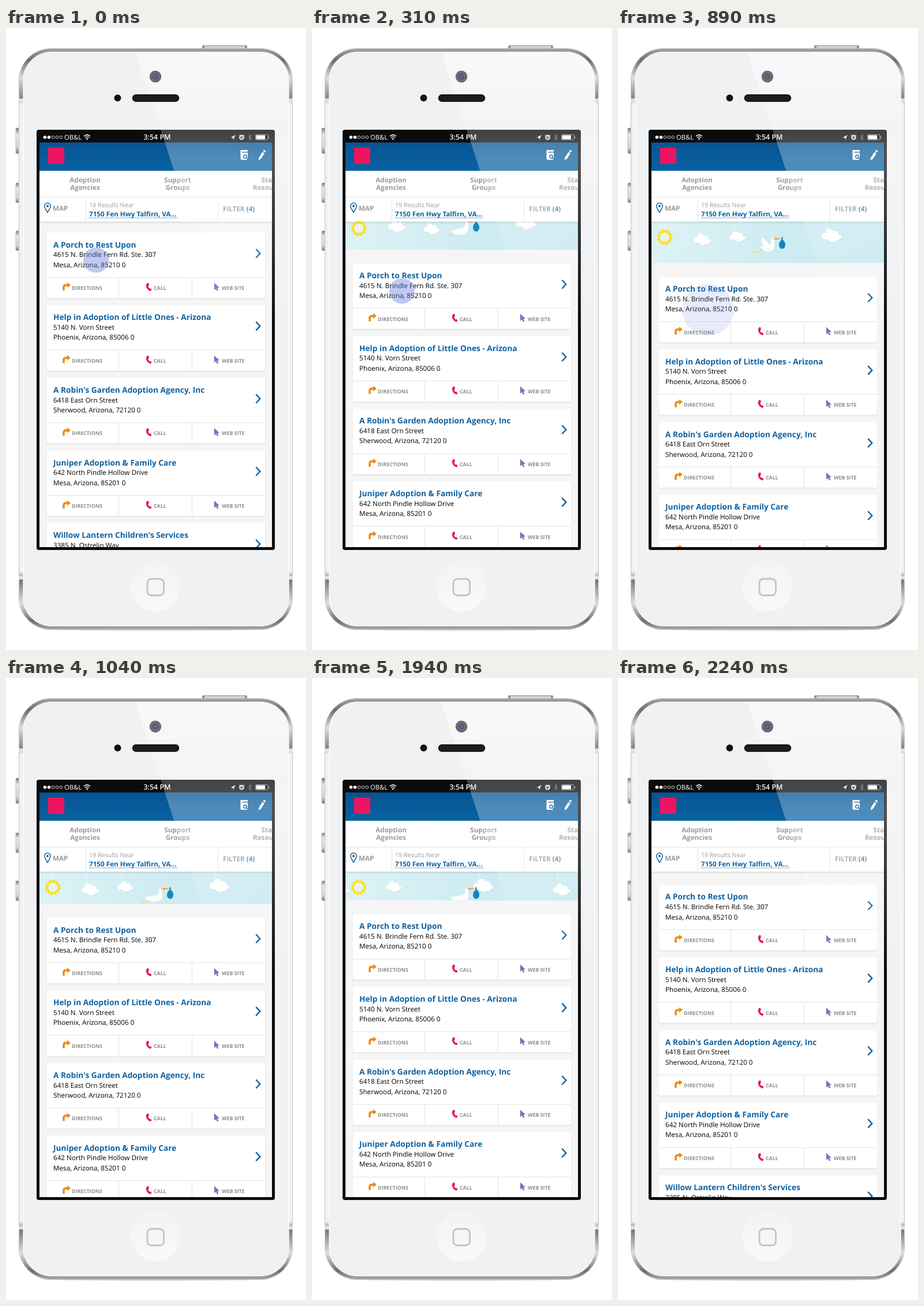
Write an HTML page that moves like this. It is 520 by 1076 pixels and loops after 2.45 s.

```html
<!DOCTYPE html>
<html lang="en">
<head>
<meta charset="utf-8">
<title>Pull to refresh</title>
<style>
  html, body { margin: 0; width: 100%; height: 100%; overflow: hidden; background: #fff; }
  svg { display: block; width: 100%; height: 100%; }
  text { font: 11.7px "Open Sans", sans-serif; text-rendering: geometricPrecision; }
  .b { font-weight: 700; }
  .grey { fill: #9b9b9b; }
  .blue { fill: #0f62a2; }
  .mid { text-anchor: middle; }
  .title { font-size: 13.7px; }
  .foot { font-size: 8.8px; fill: #8c8c8c; }
  .line { stroke: #e2e3e4; fill: none; }
</style>
</head>
<body>
<svg viewBox="0 0 520 1076">
  <defs>
    <linearGradient id="metal" x2="0" y2="1">
      <stop offset="0" stop-color="#a5a5a5"/><stop offset=".02" stop-color="#6c6d6e"/>
      <stop offset=".05" stop-color="#dcdede"/><stop offset=".085" stop-color="#858686"/>
      <stop offset=".095" stop-color="#eff2f1"/><stop offset=".9" stop-color="#eff2f1"/>
      <stop offset=".915" stop-color="#777878"/><stop offset=".955" stop-color="#dfe1e1"/>
      <stop offset=".985" stop-color="#6c6d6e"/><stop offset="1" stop-color="#aaa"/>
    </linearGradient>
    <linearGradient id="key" x2="0" y2="1">
      <stop offset="0" stop-color="#777"/><stop offset=".25" stop-color="#e8e8e8"/>
      <stop offset=".75" stop-color="#d5d6d6"/><stop offset="1" stop-color="#777"/>
    </linearGradient>
    <linearGradient id="head" x2="0" y2="1">
      <stop offset="0" stop-color="#055493"/><stop offset="1" stop-color="#0a62a2"/>
    </linearGradient>
    <linearGradient id="sky">
      <stop offset="0" stop-color="#ddf2f5"/><stop offset=".6" stop-color="#cdebf2"/><stop offset="1" stop-color="#c9e9f1"/>
    </linearGradient>
    <linearGradient id="gloss" gradientUnits="userSpaceOnUse" x1="0" y1="42" x2="0" y2="520">
      <stop offset="0" stop-color="#fff" stop-opacity=".55"/><stop offset=".27" stop-color="#fff" stop-opacity=".22"/>
      <stop offset=".38" stop-color="#fff" stop-opacity=".29"/><stop offset="1" stop-color="#fff" stop-opacity="0"/>
    </linearGradient>
    <linearGradient id="home" x2="0" y2="1">
      <stop offset="0" stop-color="#f3f3f4"/><stop offset="1" stop-color="#f9f9fa"/>
    </linearGradient>
    <linearGradient id="under" x2="0" y2="1">
      <stop offset="0" stop-opacity=".12"/><stop offset="1" stop-opacity="0"/>
    </linearGradient>
    <pattern id="mesh" width="3" height="3" patternUnits="userSpaceOnUse">
      <rect width="3" height="3" fill="#151515"/><circle cx="1.5" cy="1.5" r=".7" fill="#444"/>
    </pattern>
    <clipPath id="view"><rect x="58" y="335" width="403" height="563"/></clipPath>
    <clipPath id="screen"><rect x="58" y="181" width="403" height="717"/></clipPath>
    <clipPath id="skyClip"><rect id="skyBox" x="58" y="335" width="403" height="0"/></clipPath>

    <g id="cloud">
      <path d="M-7-8V-60" stroke="#fff" stroke-width=".8" opacity=".8"/>
      <path d="M-14 2C-14-3-9-4-8-2C-10-10 1-12 3-5C7-8 12-4 11 0C15 0 18 5 15 6C11 6 10 8 9 10C7 9 4 9 2 12C0 9-4 10-6 6C-9 8-14 6-14 2Z" fill="#c6dde4"/>
      <path d="M-15 1C-15-4-10-5-9-3C-11-11 0-13 2-6C6-9 11-5 10-1C14-1 17 4 14 5C10 5 9 7 8 9C6 8 3 8 1 11C-1 8-5 9-7 5C-10 7-15 5-15 1Z" fill="#fff"/>
    </g>

    <!-- one card, without its words -->
    <g id="card">
      <rect x="69.5" y="355" width="381" height="115" rx="3" fill="#000" opacity=".025"/>
      <rect x="70" y="354.5" width="380" height="114" rx="2" fill="#000" opacity=".05"/>
      <rect x="70.5" y="354" width="379" height="113.3" rx="2" fill="#fff"/>
      <path class="line" d="M70.5 431.5H449.5M195.5 432V467M322.5 432V467"/>
      <path d="M433.3 382.5L440.3 390L433.3 397.5" fill="none" stroke="#0f62a2" stroke-width="2.4"/>
      <path d="M100 454V448.500Q100 444.800 104 444.800H107" fill="none" stroke="#f18a0e" stroke-width="3.6"/>
      <path d="M106 440L112 444.700L106 449.500Z" fill="#f18a0e"/>
      <path d="M244.5 441.500L247 441L248 445L246.300 446.600Q247 449.500 249.300 451L251.300 450.300L252.300 453.400L250.300 455Q245.500 453.500 243.300 448.500Q242 444 244.500 441.500Z" fill="#e8125f"/>
      <path d="M360.800 440.800L370 449.300L366.300 449.800L368.400 454L366 455L364 450.900L361 453.400Z" fill="#7076bd"/>
      <text class="b foot" x="114" y="453.200">DIRECTIONS</text>
      <text class="b foot" x="256" y="453.200">CALL</text>
      <text class="b foot" x="374" y="453.200">WEB SITE</text>
    </g>
  </defs>

  <!-- phone -->
  <ellipse cx="259" cy="1040" rx="195" ry="2.5" fill="#999" opacity=".5"/>
  <rect x="340" y="30" width="78" height="10" rx="2" fill="#8f9090"/>
  <rect x="344" y="31" width="70" height="4" fill="#d0d1d1"/>
  <g fill="url(#key)" stroke="#a5a6a6" stroke-width=".7">
    <rect x="17" y="173" width="7" height="44" rx="1.5"/>
    <rect x="17" y="268" width="7" height="34" rx="1.5"/>
    <rect x="17" y="351" width="7" height="34" rx="1.5"/>
  </g>
  <rect x="22.500" y="35.500" width="474" height="1005" rx="55" fill="url(#metal)" stroke="#c0c3c2"/>
  <path d="M22 125H31M489 125H497M22 951H31M489 951H497" stroke="#dfe1e1" stroke-width="6"/>
  <rect x="30" y="41.500" width="460" height="993" rx="49" fill="#f0f1f3" stroke="#fff" stroke-width="1.2"/>
  <circle cx="259.500" cy="966" r="43.500" fill="url(#home)"/>
  <rect x="245" y="953" width="28.500" height="28.500" rx="7" fill="none" stroke="#c3c3c6" stroke-width="2.8"/>
  <rect x="53" y="176" width="413" height="727" rx="4" fill="#0b0b0c"/>

  <!-- list -->
  <rect x="58" y="335" width="403" height="563" fill="#f5f5f6"/>
  <g clip-path="url(#skyClip)">
    <rect x="58" y="335" width="403" height="90" fill="url(#sky)"/>
    <g id="sun">
      <path d="M81 350V290" stroke="#fff" stroke-width=".8" opacity=".8"/>
      <circle cx="81" cy="362" r="9.800" fill="#e6f4ee" stroke="#fde01c" stroke-width="3.2"/>
      <circle cx="81" cy="362" r="12.300" fill="none" stroke="#fde01c" stroke-width="2.6" stroke-dasharray="3.500 2.940"/>
    </g>
    <g id="clouds"></g>
    <g id="stork">
      <path d="M234.500 389Q240 389 245 386T262 384" fill="none" stroke="#f3d576" stroke-width="1.6"/>
      <path d="M247 379Q256 376 261 376Q266 374 265.500 368Q265 362.500 269 362.500Q273 363 272 367Q269 370 271 377Q270 387 259 386.500Q252 386 247 379Z" fill="#fff"/>
      <path id="wing" d="M265 379Q260 368 249 362.500Q247.500 369 251 374Q254 382 262 384Z" fill="#fcfdfd" stroke="#e2eef0" stroke-width=".5"/>
      <path d="M271 362.700L286 364.600L271.500 366.500Z" fill="#f5a33c"/>
      <circle cx="269.500" cy="365" r=".7" fill="#444"/>
      <path d="M283 362L286 362.500L285.300 366Q290.500 370 290 376Q289 382 284.500 382Q279.500 381.500 279 376Q279 370 283.800 366Z" fill="#1688bd"/>
      <path d="M282 371Q287 375 288 379" fill="none" stroke="#0f6fa3" stroke-width=".8"/>
    </g>
  </g>
  <g clip-path="url(#view)">
    <g id="list"></g>
    <circle id="touch" cx="156" fill="#6a7fdc"/>
  </g>

  <!-- bars -->
  <rect x="58" y="335" width="403" height="4" fill="url(#under)"/>
  <rect x="58" y="198" width="403" height="49" fill="url(#head)"/>
  <rect x="58" y="247" width="403" height="88" fill="#fff"/>
  <path class="line" d="M58 292.500H461M138.500 293V334M367.500 293V334"/>
  <g clip-path="url(#screen)">
    <g class="grey">
      <g class="mid">
        <text class="b" x="137" y="266.700">Adoption</text><text class="b" x="137" y="280.300">Agencies</text>
        <text class="b" x="297.500" y="266.700">Support</text><text class="b" x="297.500" y="280.300">Groups</text>
      </g>
      <text class="b" x="442.500" y="266.700">State</text><text class="b" x="428" y="280.300">Resources</text>
      <text class="b" x="81" y="315.500">MAP</text>
      <text class="b" x="376" y="316.500">FILTER <tspan fill="#3b81b4">(4)</tspan></text>
      <text x="144" y="310" style="font-size:10.700px">19 Results Near</text>
    </g>
    <text class="b blue" x="144" y="325.500">7150 Fen Hwy Talfirn, VA...</text>
  </g>
  <path d="M144 328.500H298" stroke="#0f62a2" stroke-dasharray="1.200 1.200"/>
  <path d="M72 319Q66.800 311 66.800 308A5.200 5.200 0 0 1 77.200 308Q77.200 311 72 319Z" fill="none" stroke="#0f62a2" stroke-width="1.500"/>
  <circle cx="72" cy="308" r="2" fill="#0f62a2"/>

  <path d="M224 42H437Q489 44 489 95V520H381Z" fill="url(#gloss)"/>
  <circle cx="259" cy="84" r="10.300" fill="#6b6c72"/>
  <circle cx="259" cy="84" r="5" fill="#525a78"/>
  <circle cx="259" cy="84" r="2.300" fill="#666d8c"/>
  <circle cx="193.500" cy="121" r="6" fill="#111"/>
  <rect x="219.500" y="115.500" width="80" height="11.500" rx="5.700" fill="url(#mesh)" stroke="#111" stroke-width="1.500"/>

  <rect x="73" y="207" width="28" height="28" fill="#ec1561"/>
  <g fill="#fff">
    <path d="M407 211H419V214H409V215.500H419V228H408Q406.500 228 406.500 226V212Z"/>
    <circle cx="414.500" cy="222.500" r="2.700" fill="none" stroke="#2b78ae" stroke-width="1.400"/>
    <path d="M416.500 224.500L420 228" stroke="#2b78ae" stroke-width="1.500"/>
    <path d="M437.500 229L438.500 224L444.500 214.500L448 216.700L442 226.300ZM445.400 213L446.800 211Q449.500 211 450.300 213.200L449 215.300Z"/>
    <circle cx="67.500" cy="189" r="2.800"/><circle cx="74.500" cy="189" r="2.800"/>
    <g fill="none" stroke="#fff" stroke-width=".8">
      <circle cx="81.500" cy="189" r="2.400"/><circle cx="88.500" cy="189" r="2.400"/><circle cx="95.300" cy="189" r="2.400"/>
    </g>
    <text x="101" y="193.200" style="font-size:11.300px">OB&amp;L</text>
    <text class="mid" x="262" y="193.300" style="font-size:12.400px;font-weight:600">3:54 PM</text>
    <path d="M135 187.300Q140.500 182.500 146 187.300M137 189.800Q140.500 186.700 144 189.800" fill="none" stroke="#fff" stroke-width="1.500"/>
    <path d="M138.500 191.500Q140.500 189.800 142.500 191.500L140.500 193.700Z"/>
    <path d="M389.500 189.700L397.500 185L394 193.500L393.300 189.900Z"/>
    <circle cx="408.500" cy="189.300" r="3.300" fill="none" stroke="#fff" stroke-width="1.900"/>
    <path d="M404 186.500L406 184.500M411 184.500L413 186.500M408.500 187.500V189.500H410" stroke="#fff" fill="none"/>
    <path d="M420 186.300L425.500 191.500L422.800 194V184L425.500 186.500L420 191.700" fill="none" stroke="#999" stroke-width=".9"/>
    <rect x="432.500" y="184.500" width="21.500" height="9" rx="1.500" fill="none" stroke="#bbb" stroke-width=".8"/>
    <rect x="433.500" y="185.500" width="15.500" height="7" rx=".5"/>
    <rect x="454.800" y="187.500" width="1.300" height="3.500" fill="#bbb"/>
  </g>
</svg>

<script>
const LOOP = 2450, PULL = 89, REST = 54.7, PITCH = 125.65;
const $ = id => document.getElementById(id);
const clamp = x => Math.min(1, Math.max(0, x));
const ramp = (t, from, to) => clamp((t - from) / (to - from));
const shift = (el, x, y) => el.setAttribute('transform', `translate(${x} ${y})`);

const agencies = [
  ['A Porch to Rest Upon', '4615 N. Brindle Fern Rd. Ste. 307', 'Mesa, Arizona, 85210 0'],
  ['Help in Adoption of Little Ones - Arizona', '5140 N. Vorn Street', 'Phoenix, Arizona, 85006 0'],
  ["A Robin's Garden Adoption Agency, Inc", '6418 East Orn Street', 'Sherwood, Arizona, 72120 0'],
  ['Juniper Adoption &amp; Family Care', '642 North Pindle Hollow Drive', 'Mesa, Arizona, 85201 0'],
  ["Willow Lantern Children's Services", '3385 N. Ostrelin Way', 'Tucson, Arizona, 85712 0'],
];
$('list').innerHTML = agencies.map(([name, street, city], i) => `
  <g transform="translate(0 ${i * PITCH})">
    <use href="#card"/>
    <text class="b blue title" x="82" y="379.7">${name}</text>
    <text x="82" y="396.3">${street}</text>
    <text x="82" y="413.8">${city}</text>
  </g>`).join('');

// x, y, scale, drift speed in px/ms, height of the drop
const clouds = [
  [147, 366, 1, .108, 57],
  [207.5, 361, .92, .0727, 33],
  [370.5, 359, 1.15, .081, 55],
  [530.5, 366, 1, .108, 57],
];
$('clouds').innerHTML = '<use href="#cloud"/>'.repeat(clouds.length);
const cloudEls = [...$('clouds').children];

// The picture advances in 30 ms steps, with three longer rests.
function stepTime(t) {
  if (t < 160) return 130;
  if (t < 430) return 160 + 30 * Math.floor((t - 160) / 30);
  if (t < 770) return t < 600 ? 430 : 600;
  return Math.min(2240, 770 + 30 * Math.floor((t - 770) / 30));
}

function draw(now) {
  const t = stepTime(now % LOOP);
  const pulled = ramp(t, 130, 430);
  const d = PULL * pulled - (PULL - REST) * ramp(t, 770, 1100) - REST * ramp(t, 1940, 2262);
  const up = 1 - pulled;
  const drift = Math.max(0, t - 1037);

  shift($('list'), 0, d);
  $('skyBox').setAttribute('height', Math.max(0, d - 5));
  shift($('sun'), 0, -39 * up);
  shift($('stork'), 0, -75 * up);
  clouds.forEach(([x, y, s, v, drop], i) =>
    cloudEls[i].setAttribute('transform', `translate(${x - v * drift} ${y - drop * up}) scale(${s})`));

  const flap = Math.cos((t - 890) / 240 * 2 * Math.PI);
  $('wing').setAttribute('transform', `rotate(${-28 * (1 - flap)} 264 381)`);

  const gone = ramp(t, 740, 980), touch = $('touch');
  touch.setAttribute('cy', 401.5 + PULL * pulled - 5 * gone);
  touch.setAttribute('r', 22 + 36 * gone);
  touch.setAttribute('opacity', .42 * (1 - gone));
}

let start;
function tick(now) {
  start ??= now;
  draw(now - start);
  requestAnimationFrame(tick);
}
requestAnimationFrame(tick);
</script>
</body>
</html>
```
